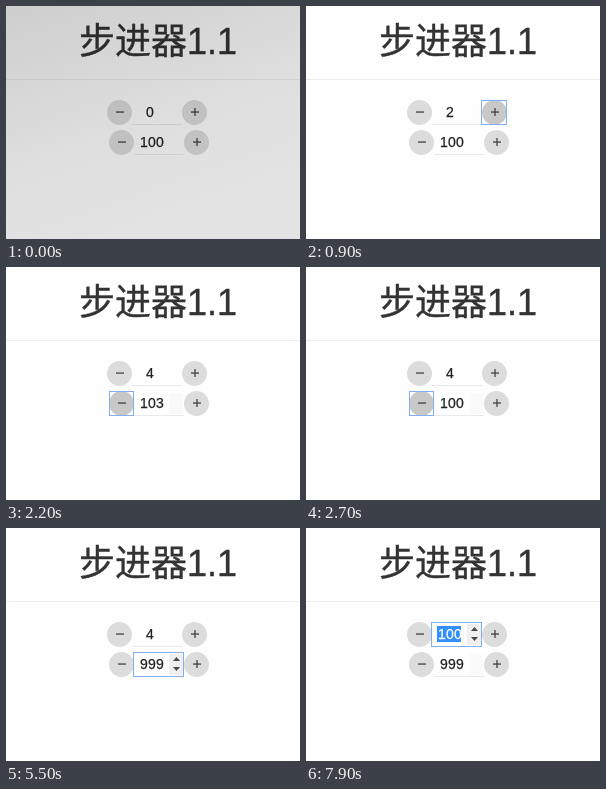
Recreate the animation shown at these times as an HTML page. Size 294 px wide and 233 px high, loop 8000 ms.

```html
<!DOCTYPE html>
<html lang="zh-CN">
<head>
<meta charset="utf-8">
<title>步进器</title>
<style>
html, body { margin: 0; width: 100%; height: 100%; overflow: hidden; background: #fefefe; }
svg { display: block; }
text { font-family: "Liberation Sans", Arial, "Noto Sans CJK SC", "Noto Sans CJK", sans-serif; fill: #222; white-space: pre; }
.title { font-size: 36px; font-weight: 500; fill: #333; stroke: #333; stroke-width: .4px; }
.num { font-size: 14px; letter-spacing: .214px; }
.ring { fill: none; stroke: #82aff0; }
</style>
</head>
<body>
<svg id="stage" width="294" height="233" viewBox="0 0 294 233">
  <defs>
    <linearGradient id="shade" x1="0" y1="0" x2=".45" y2="1">
      <stop offset="0" stop-opacity=".19"/>
      <stop offset=".6" stop-opacity=".125"/>
      <stop offset="1" stop-opacity=".105"/>
    </linearGradient>
  </defs>
  <rect width="294" height="233" fill="#fefefe"/>
  <text class="title" x="73" y="48">步进器1.1</text>
  <rect y="73" width="294" height="1" fill="#eee"/>
</svg>
<script>
const LOOP = 8000, DIGIT = 8;
const stage = document.getElementById('stage');

function add(tag, attrs, parent = stage) {
  const el = document.createElementNS('http://www.w3.org/2000/svg', tag);
  set(el, attrs);
  parent.append(el);
  return el;
}

function set(el, attrs) {
  for (const k in attrs) el.setAttribute(k, attrs[k]);
}

const show = (el, on) => set(el, { opacity: +on });

function button(x, y, sign) {
  const disc = add('circle', { cx: x + 12.5, cy: y + 12.5, r: 12.5 });
  const bar = { fill: '#45423f' };
  add('rect', { x: x + 9, y: y + 11.4, width: 8, height: 1.3, ...bar });
  if (sign === '+') add('rect', { x: x + 12.35, y: y + 8, width: 1.3, height: 8, ...bar });
  return disc;
}

function stepper(x, y) {
  const field = x + 25, mid = x + 43;
  add('rect', { x: field, y: y + 24, width: 50, height: 1, fill: '#eaeaea' });
  const track = add('rect', { x: x + 60, y: y + 2, width: 14, height: 21 });
  const arrows = add('path', {
    d: `M${x + 64} ${y + 9}l3.5-4 3.5 4zM${x + 64} ${y + 15}l3.5 4 3.5-4z`, fill: '#484848'
  });
  const mark = add('rect', { y: y + 4, height: 16, fill: '#338fff' });
  const plain = add('text', { class: 'num', y: y + 17, stroke: '#222', 'stroke-width': .25 });
  const before = add('tspan', {}, plain);
  const picked = add('tspan', { fill: '#fff', stroke: '#fff' }, plain);
  const caret = add('rect', { y: y + 4, width: 1, height: 16, fill: '#111' });
  const minus = button(x, y, '-'), plus = button(x + 75, y, '+');
  const ring = add('rect', { class: 'ring', y: y + .5, height: 24 });
  const boxes = { '-': [x + .5, 24], '+': [x + 74.5, 25], in: [x + 24.5, 50] };

  return s => {
    const str = String(s.value), n = str.length, left = mid - n * DIGIT / 2;
    const cut = n - s.sel;
    set(plain, { x: left });
    before.textContent = str.slice(0, cut);
    picked.textContent = str.slice(cut);
    set(mark, { x: left + cut * DIGIT - 1, width: s.sel * DIGIT });
    set(caret, { x: left + n * DIGIT - 1 });
    show(caret, s.caret);
    set(track, { fill: s.spin ? '#efefef' : '#fafafa' });
    show(track, s.seen);
    show(arrows, s.spin);
    set(minus, { fill: s.hot === '-' ? '#c8c8c8' : '#dddcdc' });
    set(plus, { fill: s.hot === '+' ? '#c8c8c8' : '#dddcdc' });
    show(ring, s.ring);
    if (s.ring) set(ring, { x: boxes[s.ring][0], width: boxes[s.ring][1] });
  };
}

const rest = { hot: '', ring: '', sel: 0, caret: 0, spin: 0, seen: 0 };
const start = { top: { ...rest, value: 0 }, low: { ...rest, value: 100 } };

// [time, row, changes]
const steps = [
  [400, 'top', { hot: '+' }],
  [700, 'top', { ring: '+' }],
  [800, 'top', { value: 1 }],
  [900, 'top', { value: 2 }],
  [1100, 'top', { value: 3 }],
  [1200, 'top', { value: 4 }],
  [1300, 'top', { hot: '' }],
  [1400, 'top', { ring: '' }],
  [1400, 'low', { hot: '+', ring: '+' }],
  [1500, 'low', { value: 101 }],
  [1700, 'low', { value: 102 }],
  [1900, 'low', { value: 103 }],
  [2000, 'low', { hot: '', spin: .5, seen: 1 }],
  [2100, 'low', { hot: '-', spin: 0 }],
  [2200, 'low', { ring: '-' }],
  [2300, 'low', { value: 102 }],
  [2500, 'low', { value: 101 }],
  [2700, 'low', { value: 100 }],
  [2900, 'low', { hot: '', spin: .3 }],
  [3000, 'low', { spin: .7 }],
  [3100, 'low', { spin: 1 }],
  [3300, 'low', { ring: 'in', caret: 1 }],
  [3400, 'low', { sel: 3, caret: 0 }],
  [4300, 'low', { sel: 0, caret: 1 }],
  [4600, 'low', { value: 999 }],
  [5500, 'low', { caret: 0 }],
  [5800, 'low', { ring: '', spin: 0 }],
  [5800, 'top', { ring: 'in', spin: .6, seen: 1 }],
  [5900, 'top', { spin: 1, caret: 1 }],
  [6100, 'top', { sel: 1, caret: 0 }],
  [6600, 'top', { value: 1, sel: 0, caret: 1 }],
  [6900, 'top', { value: 10 }],
  [7100, 'top', { value: 100 }],
  [7800, 'top', { sel: 2, caret: 0 }],
  [7900, 'top', { sel: 3 }]
];

const draw = { top: stepper(101, 94), low: stepper(103, 124) };
const shade = add('rect', { width: 294, height: 233, fill: 'url(#shade)' });

function render(t) {
  const now = { top: { ...start.top }, low: { ...start.low } };
  for (const [at, row, change] of steps) if (t >= at) Object.assign(now[row], change);
  draw.top(now.top);
  draw.low(now.low);
  show(shade, t < 100);
}

const origin = performance.now();
function tick() {
  render((performance.now() - origin) % LOOP);
  requestAnimationFrame(tick);
}
tick();
</script>
</body>
</html>
```
